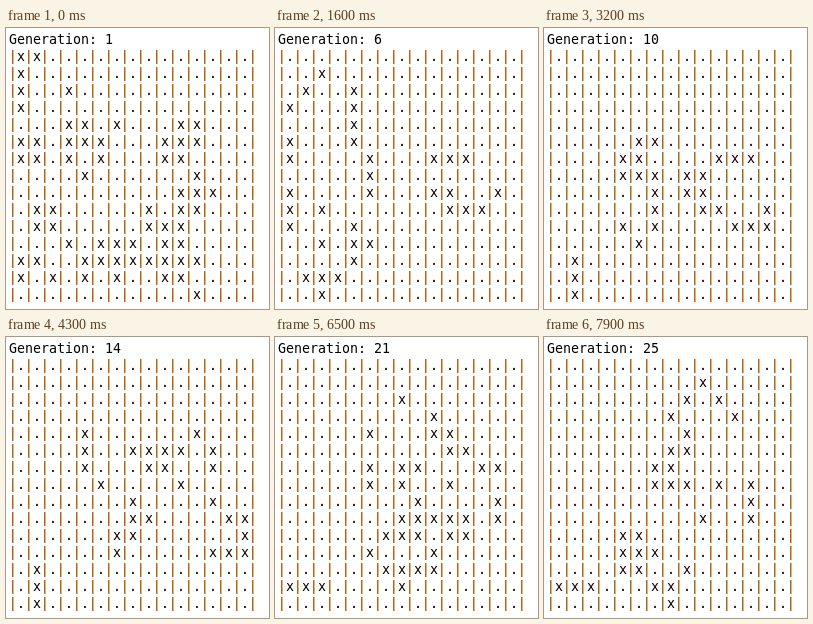
An HTML page with a canvas for the animation above (8000 ms loop, 263x281 px).

```html
<!DOCTYPE html>
<html lang="en">
<head>
<meta charset="utf-8">
<title>Game of Life</title>
<style>
  html, body { margin: 0; width: 100%; height: 100%; overflow: hidden; background: #fff; }
  canvas { display: block; }
</style>
</head>
<body>
<canvas id="stage" width="263" height="281"></canvas>
<script>
const ctx = document.getElementById('stage').getContext('2d');
const SIZE = 15, LOOP = 8000, LAST = 25;
const LEFT = 3, CHAR = 8, BASE = 16, LINE = 17;

const seed = [
  'xx.............',
  'x..............',
  'x..x...........',
  'x..............',
  '...xx.x...xx...',
  'xx.xxx...xxx...',
  'xx.x.x...xx....',
  '....x......x...',
  '..........xxx..',
  '.xx.....x.xx...',
  '.xx.....xxx....',
  '...x.xxx.xx....',
  'xx..xxxxxxxx...',
  'x.x.x.x..xx....',
  '...........x...'
];

// Times (in tenths of a second) at which each later generation appears
const starts = [2, 5, 8, 12, 15, 19, 22, 26, 29, 33, 36, 39, 42, 45, 48, 51,
                55, 58, 61, 64, 68, 71, 74, 77];

// Cells beyond the edge count as dead
function neighbours(board, r, c) {
  let n = 0;
  for (let y = r - 1; y <= r + 1; y++)
    for (let x = c - 1; x <= c + 1; x++)
      if ((y !== r || x !== c) && board[y]?.[x] === 'x') n++;
  return n;
}

function step(board) {
  return board.map((row, r) => [...row].map((cell, c) => {
    const n = neighbours(board, r, c);
    return n === 3 || (n === 2 && cell === 'x') ? 'x' : '.';
  }).join(''));
}

const boards = [seed];
while (boards.length < LAST) boards.push(step(boards[boards.length - 1]));

function put(text, col, line) {
  ctx.fillText(text, LEFT + col * CHAR, BASE + line * LINE);
}

function drawBar(col, line) {
  const x = LEFT + col * CHAR + 3, y = BASE + line * LINE - 11;
  ctx.fillStyle = '#b5651d';
  ctx.fillRect(x, y, 1, 14);
  ctx.fillStyle = '#e0b080';
  ctx.fillRect(x + 1, y, 1, 14);
}

function draw(index) {
  ctx.fillStyle = '#fff';
  ctx.fillRect(0, 0, 263, 281);
  ctx.font = '13.3px "DejaVu Sans Mono", monospace';
  ctx.fillStyle = '#000';
  put('Generation: ' + (index + 1), 0, 0);
  boards[index].forEach((row, r) => {
    for (let c = 0; c <= SIZE; c++) drawBar(c * 2, r + 1);
    ctx.fillStyle = '#000';
    for (let c = 0; c < SIZE; c++) put(row[c], c * 2 + 1, r + 1);
  });
}

let shown = -1;
function tick(now) {
  const t = (now % LOOP) / 100;
  const index = starts.filter(s => s <= t).length;
  if (index !== shown) draw(shown = index);
  requestAnimationFrame(tick);
}
draw(0);
requestAnimationFrame(tick);
</script>
</body>
</html>
```
